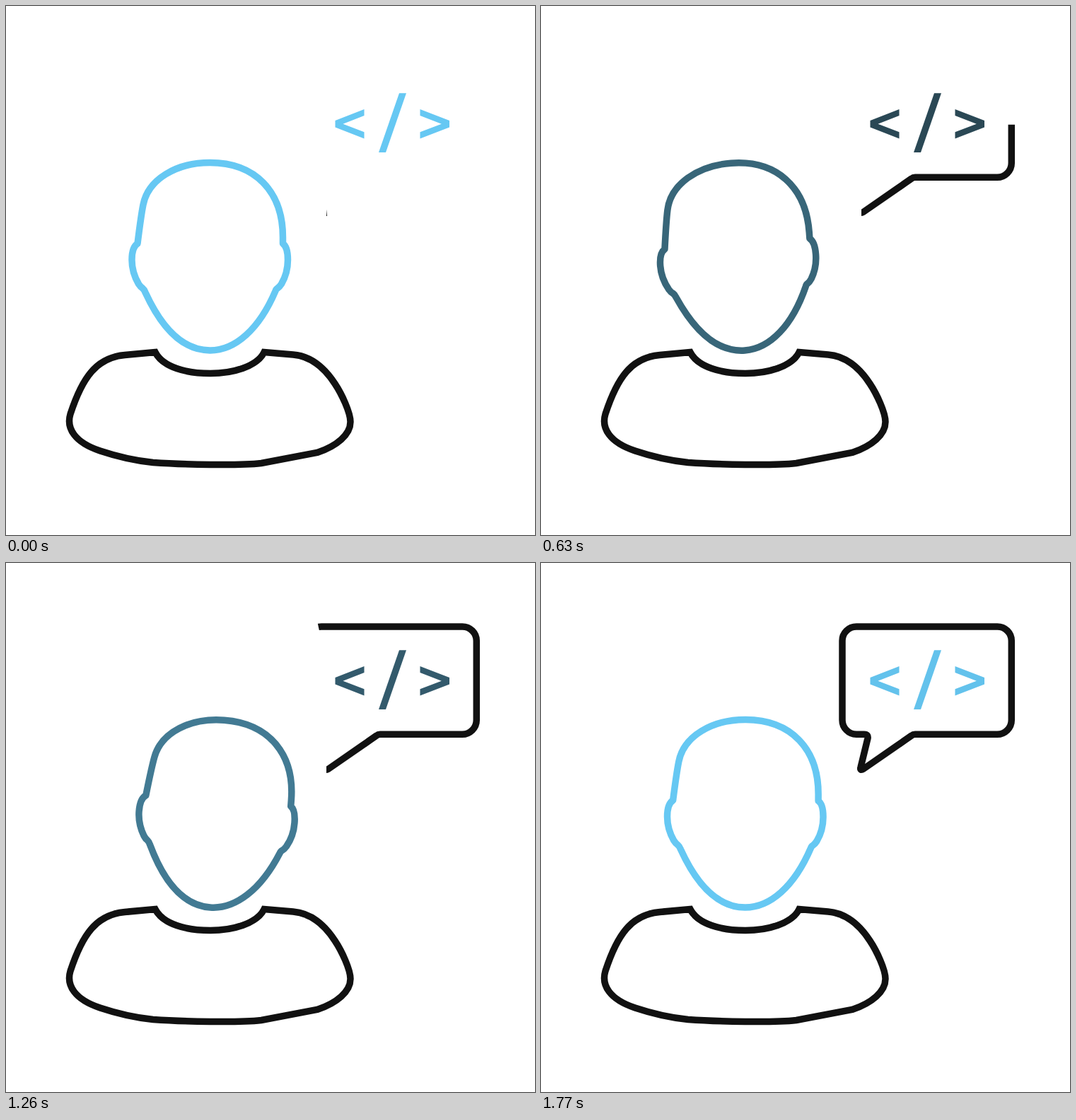
Recreate the animation shown at these times as an HTML page. Size 748 by 748 pixels, loop 1800 ms.

```html
<!DOCTYPE html>
<html lang="en">
<head>
<meta charset="utf-8">
<title>Developer icon</title>
<style>
  html, body { margin: 0; width: 100%; height: 100%; overflow: hidden; background: #fff; }
  svg { display: block; width: 100%; height: 100%; }
</style>
</head>
<body>
<svg viewBox="0 0 748 748" fill="none" stroke="#111" stroke-width="9.5">
  <path d="M211 489.5 L168 493.5 C128 497 108 525 91 577 C85 597 97 617 133 629
    C157 637 183 643 208 645.5 C250 648.5 330 650 361 646.5 L440 631.5
    C468 622 487 606 487 588 C487 575 475 549 465 534 C450 511 431 495 406 493
    L365 489.5 C355 510 320 519.5 289 519.5 C255 519.5 222 511 211 489.5 Z"/>
  <path id="head" stroke-linejoin="round" d="M186 336 C188 320 191 296 194 281
    C201 245 241 221.5 288.5 221.5 C352 221.5 391.5 262 391.5 327 V336
    C396 339 398.5 346 398.5 359 C398.5 375 393 387 389.5 393 Q387 397 384 399 Q382 400 381 403
    C358 457 324 487 288.5 487 C250 487 220 455 197 405 Q195.5 401 193 399 Q190 397 187.5 393
    C184 387 178 375 178 359 C178 346 181 339 186 336 Z"/>
  <path id="bubble" d="M453 292.3 C454 292.3 454.8 292 455.5 291.5 L524 244 Q526 242.3 529 242.3
    H645 A20.3 20.3 0 0 0 665.3 222 V110 A20 20 0 0 0 645 90 H446 A20 20 0 0 0 426 110
    V222 A20.3 20.3 0 0 0 446 242.3 H457 Q463 242.3 462 248 L452 289 Q451 292.3 453.5 292.3"/>
  <g id="code" stroke="none">
    <path d="M465.5 162 L506.5 146 V155 L476.5 166.8 L506.5 178.3 V187.5 L465.5 171.5 Z"/>
    <path d="M556 123.3 H566 L537 207 H527 Z"/>
    <path d="M627 162 L585.5 146 V155 L615.8 166.8 L585.5 178.3 V187.5 L627 171.5 Z"/>
  </g>
</svg>
<script>
const LOOP = 1800;
const DRAW_SPEED = 0.4645; // px per ms
const BLUE = [102, 200, 243];
const BLACK = [17, 17, 17];
const [head, bubble, code] = ['head', 'bubble', 'code'].map(id => document.getElementById(id));

// Linear interpolation through [time, value] keys.
function track(keys, t) {
  const i = Math.max(1, keys.findIndex(([time]) => time >= t));
  const [t0, v0] = keys[i - 1];
  const [t1, v1] = keys[i];
  return v0 + (v1 - v0) * (t - t0) / (t1 - t0);
}

const tilt = [[0, 0], [585, -5], [1170, 5], [LOOP, 0]];
const headBlue = [[0, 1], [318, 1], [900, 0], [1530, 1], [LOOP, 1]];
const codeBlue = [[0, 1], [900, 0], [LOOP, 1]];

const tint = k => `rgb(${BLACK.map((c, i) => Math.round(c + (BLUE[i] - c) * k))})`;

function render(t) {
  head.setAttribute('transform', `rotate(${track(tilt, t)} 288.5 490)`);
  head.setAttribute('stroke', tint(track(headBlue, t)));
  code.setAttribute('fill', tint(track(codeBlue, t)));
  bubble.setAttribute('stroke-dasharray', `${t * DRAW_SPEED} 2000`);
  bubble.setAttribute('visibility', t > 0 ? 'visible' : 'hidden');
}

const start = performance.now();
function tick() {
  render((performance.now() - start) % LOOP);
  requestAnimationFrame(tick);
}
render(0);
requestAnimationFrame(tick);
</script>
</body>
</html>
```
